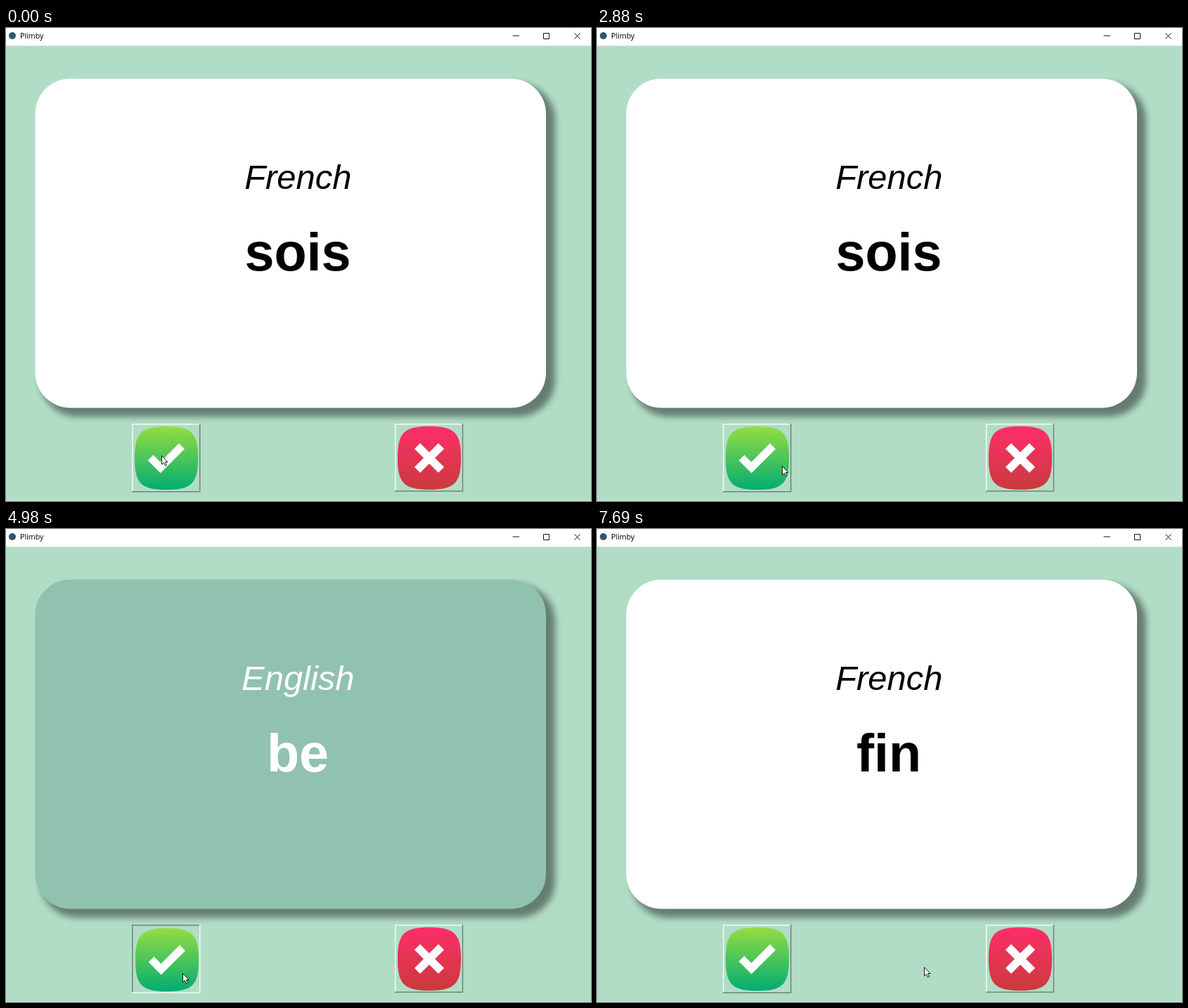
These frames come from a looping animation (832 px wide and 673 px high, 8000 ms). An HTML page:

```html
<!DOCTYPE html>
<html lang="en">
<head>
<meta charset="utf-8">
<title>Flash cards</title>
<style>
  html, body { margin: 0; width: 100%; height: 100%; overflow: hidden; background: #b1ddc6; }
  svg { display: block; width: 100%; height: 100%; }
  text { font-family: "Liberation Sans", Arial, sans-serif; font-variant-ligatures: none; }
  .bar { font: 10.7px "Open Sans", sans-serif; }
  .mid { text-anchor: middle; }
  #lang { font-size: 48.9px; font-style: italic; }
  #word { font-size: 75.5px; font-weight: bold; }
  .edge { fill: none; stroke-width: 1.5; }
</style>
</head>
<body>
<svg viewBox="0 0 832 673">
  <defs>
    <linearGradient id="green" x2="0" y2="1">
      <stop stop-color="#94dd42"/><stop offset="1" stop-color="#02ac72"/>
    </linearGradient>
    <linearGradient id="red" x2="0" y2="1">
      <stop stop-color="#fe2e6a"/><stop offset="1" stop-color="#ca3a3c"/>
    </linearGradient>
    <filter id="blur" x="-10%" y="-10%" width="120%" height="120%">
      <feGaussianBlur stdDeviation="5"/>
    </filter>
    <path id="tile" d="M0-45C36-45 45-36 45 0S36 45 0 45-45 36-45 0-36-45 0-45Z"/>
  </defs>

  <rect width="832" height="673" fill="#b1ddc6"/>
  <rect y="672" width="832" height="1" fill="#d9e6df"/>
  <rect width="832" height="25.3" fill="#fff"/>
  <circle cx="9" cy="11" r="5" fill="#2f566d"/>
  <text class="bar" x="20" y="15">Plimby</text>
  <path d="M720.5 11h9.5M764.5 7.5h8v8h-8zM808.5 7.5l8 8m0-8l-8 8" fill="none" stroke="#111"/>

  <rect x="49" y="79" width="732" height="474" rx="52" opacity=".43" filter="url(#blur)"/>
  <rect id="card" x="41.5" y="72" width="726.5" height="468.5" rx="50"/>
  <text id="lang" class="mid" x="415.3" y="229.3"/>
  <text id="word" class="mid" x="415" y="345.3"/>

  <g transform="translate(179 563)">
    <path id="lit" class="edge" d="M.8 97V.8H97"/>
    <path id="dark" class="edge" d="M0 96.7H96.7V0"/>
    <g id="yes">
      <use href="#tile" fill="url(#green)"/>
      <path d="M-26.3 3.3l7.8-7.8 10 10 26.500-26.500 8 8-34.300 34.300z" fill="#fff"/>
    </g>
  </g>
  <g transform="translate(553 563)">
    <path class="edge" d="M.8 96V.8H97" stroke="#f2faf6"/>
    <path class="edge" d="M0 96H96.5V0" stroke="#74827b"/>
    <g transform="translate(49 48.8)">
      <use href="#tile" fill="url(#red)"/>
      <path d="M-17-17L17 17M17-17L-17 17" stroke="#fff" stroke-width="11.5"/>
    </g>
  </g>
  <path id="cursor" d="M.5.5V13l3-2.700 2 4.500 2-.9-2-4.400H9z" fill="#fff" stroke="#000" stroke-width=".9"/>
</svg>
<script>
  const LOOP = 8000, STEP = 71, FLIP = 2946, PRESS = 4980, NEXT = 5050;
  const home = { x: 221, y: 608 };
  const $ = id => document.getElementById(id);

  // Each trip starts where the last one ended; bow bends its path down.
  const trips = [
    { from: 1120, to: 1490, x: 493, y: 634 },
    { from: 1564, to: 1712, x: 423, y: 630 },
    { from: 1786, to: 1860, x: 317, y: 627 },
    { from: 1930, to: 2280, x: 276, y: 624 },
    { from: 2810, to: 3150, x: 234, y: 612, bow: 3 },
    { from: 3680, to: 3950, x: 544, y: 623 },
    { from: 4150, to: 4650, x: 251, y: 632, bow: 7 },
    { from: 5770, to: 6310, x: 366, y: 633, bow: -4 },
    { from: 7040, to: 7690, x: 465, y: 623 }
  ];

  const ease = f => { f **= .9; return f * f * (3 - 2 * f); };

  // The pointer is sampled in steps and holds between them.
  function pointer(t) {
    const i = trips.findLastIndex(p => p.from <= t);
    if (i < 0) return home;
    const a = trips[i - 1] || home, b = trips[i];
    const gaps = Math.round((b.to - b.from) / STEP);
    const step = Math.floor((t - b.from) / (b.to - b.from) * gaps + 1e-6);
    const f = Math.min(1, (step + 1) / (gaps + 1)), k = ease(f);
    return {
      x: a.x + (b.x - a.x) * k,
      y: a.y + (b.y - a.y) * k + (b.bow || 0) * Math.sin(Math.PI * f)
    };
  }

  function draw(t) {
    const back = t >= FLIP && t < NEXT;
    const down = t >= PRESS && t < NEXT;
    const ink = back ? "#fff" : "#000";
    $("card").setAttribute("fill", back ? "#91c2af" : "#fff");
    $("lang").textContent = back ? "English" : "French";
    $("word").textContent = back ? "be" : t < FLIP ? "sois" : "fin";
    $("lang").setAttribute("fill", ink);
    $("word").setAttribute("fill", ink);
    $("lit").setAttribute("stroke", down ? "#74827b" : "#f2faf6");
    $("dark").setAttribute("stroke", down ? "#f2faf6" : "#74827b");
    $("yes").setAttribute("transform", down ? "translate(50 50)" : "translate(49 49)");
    const { x, y } = pointer(t);
    $("cursor").setAttribute("transform", `translate(${Math.round(x)} ${Math.round(y)})`);
  }

  const start = performance.now();
  function tick() {
    draw((performance.now() - start) % LOOP);
    requestAnimationFrame(tick);
  }
  tick();
</script>
</body>
</html>
```
